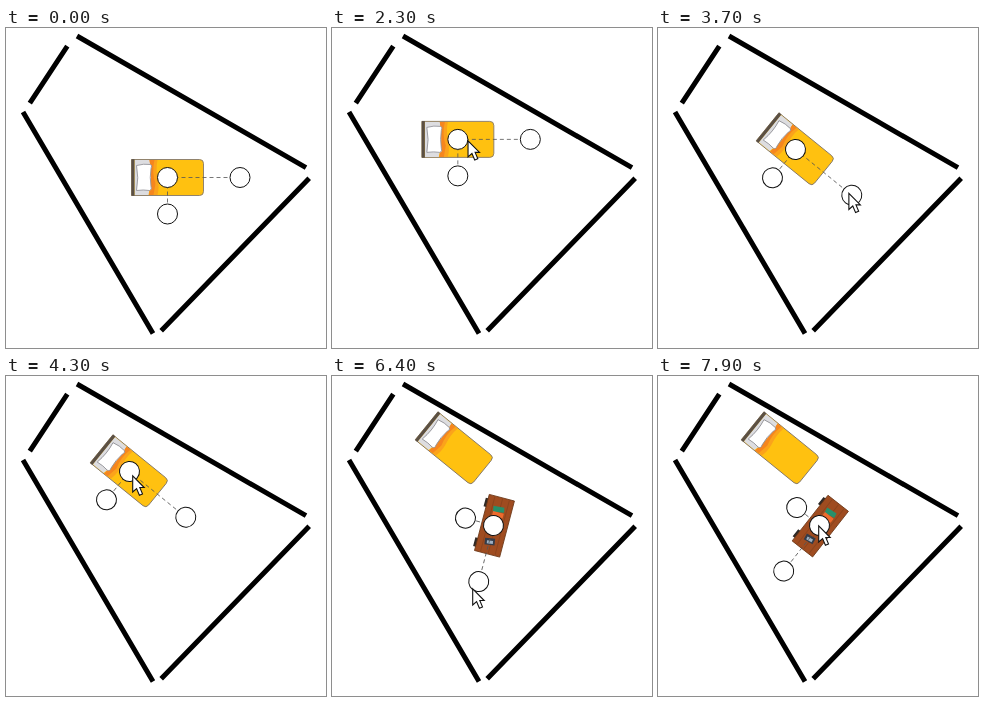
Animation of 320 by 320 pixels, one loop 8 s. Source, as an HTML page:

```html
<!DOCTYPE html>
<html lang="en">
<head>
<meta charset="utf-8">
<title>Room planner</title>
<style>
  html, body { margin: 0; width: 100%; height: 100%; overflow: hidden; background: #fff; }
  svg { display: block; width: 100vw; height: 100vh; }
  .walls { stroke: #000; stroke-width: 5; }
  .handles line { stroke: #555; stroke-width: .8; stroke-dasharray: 4 3; }
  .handles circle { fill: #fff; stroke: #111; stroke-width: 1; }
</style>
</head>
<body>
<svg viewBox="0 0 320 320">
  <path class="walls" d="M71 8 300 139.700M303.200 150.200 155.200 302.700M147 305.500 17 84M23.800 75.200 61.300 18.200"/>

  <g id="bed">
    <path d="M-36-18H32Q36-18 36-14V14Q36 18 32 18H-36Z" fill="#ffc110" stroke="#85796a" stroke-width=".9"/>
    <path d="M-33-17.500H-17Q-14-6-17 6L-19 17.500H-33Z" fill="#dddde0"/>
    <path d="M-18-17.500H-10Q-12-8-9.500 2 -8 10-10 17.500H-18.500Q-14 0-18-17.500Z" fill="#fba31b"/>
    <path d="M-18-17.500H-13Q-16-5-12 6L-14 17.500H-18.500Q-15 0-18-17.500Z" fill="#f5861f"/>
    <path d="M-31-12Q-24-14-17-13 -15-12-16.500-9 -18 0-16.500 9 -15 12-18 13 -24 12-31 13 -28.500 0-31-12Z" fill="#fff" stroke="#96969c" stroke-width=".9"/>
    <path d="M-36-18.300H-33V18.300H-36Z" fill="#5b5045"/>
  </g>

  <g id="desk">
    <path d="M-25 11H-16V14.500H-25ZM16 11H25V14.500H16Z" fill="#2f2926"/>
    <path d="M-29-14H29V12H-29Z" fill="#9f4c20" stroke="#6b3717" stroke-width=".8"/>
    <path d="M-28-9H28M-28-2H28M-28 6H28" stroke="#8c441d"/>
    <path d="M-20-6-15-7-13 4-19 5Z" fill="#27906a"/>
    <path d="M-14-7H-9V4H-14Z" fill="#ee6a2c"/>
    <path d="M12.500-5 19-6 20.500 4 14 5Z" fill="#343c49"/>
    <path d="M15-3.500 18-4 19 2 16 2.500Z" fill="#9fb2c4"/>
  </g>

  <g id="handles" class="handles">
    <line id="longArm"/><line id="shortArm"/>
    <circle r="10"/><circle id="longKnob" r="10"/><circle id="shortKnob" r="10"/>
  </g>

  <path id="cursor" d="M.7.900V17L4.600 13.600 7.400 20.200 10.500 18.900 7.800 12.500H12.200Z" fill="#fff" stroke="#111" stroke-width="1.100"/>
</svg>

<script>
const LOOP = 8000, STEP = 100, LAG = 115;
const DESK_SHOWN = 5400;
const START = [161.5, 149.5];
const el = id => document.getElementById(id);

// The pointer eases between these stops [ms, x, y]; the furniture follows it.
const stops = [
  [800, 183, -24], [1700, 171, 150], [1800, 171, 150],
  [2100, 102, 83], [2400, 147, 122], [2500, 147, 122],
  [2700, 212, 123], [2800, 212, 123], [3000, 207, 159], [3300, 196, 169], [3600, 196, 169],
  [4100, 140, 125], [4300, 126, 99], [4700, 125, 76], [4800, 125, 76],
  [4900, 145, 86], [5400, 145, 86], [5500, 189, 115], [5900, 211, 142], [6100, 211, 142],
  [6400, 140, 212], [6700, 44, 148], [7000, 76, 219], [7200, 88, 234],
  [7600, 190, 180], [7900, 160, 149]
];

const clamp = (value, low, high) => Math.min(Math.max(value, low), high);

function pointer(ms) {
  const t = clamp(ms, stops[0][0], stops[stops.length - 1][0]);
  const next = Math.max(1, stops.findIndex(stop => stop[0] >= t));
  const [t0, x0, y0] = stops[next - 1], [t1, x1, y1] = stops[next];
  const p = (t - t0) / (t1 - t0), eased = p * p * (3 - 2 * p);
  return [x0 + (x1 - x0) * eased, y0 + (y1 - y0) * eased];
}

// Displacement of the pointer within one drag.
function dragged(ms, from, to) {
  const [x0, y0] = pointer(from), [x, y] = pointer(clamp(ms, from, to));
  return [x - x0, y - y0];
}

// Direction from a pivot to the pointer while a turn lasts.
function turned(ms, from, to, [cx, cy], grip = 0) {
  if (ms <= from) return 0;
  const [x, y] = pointer(Math.min(ms, to));
  return Math.atan2(y + grip - cy, x + grip - cx) * 180 / Math.PI;
}

function bedPose(ms) {
  const first = dragged(ms, 1800, 2500), second = dragged(ms, 4100, 4800);
  const pivot = START.map((value, i) => value + first[i]);
  return [...pivot.map((value, i) => value + second[i]), turned(ms - LAG, 2800, 3600, pivot)];
}

const deskPose = ms => [...START, turned(ms, 6100, 7200, START, 4)];

function place(id, [x, y, angle = 0]) {
  el(id).setAttribute("transform", `translate(${x} ${y}) rotate(${angle})`);
}

function setArms(long, short) {
  el("longArm").setAttribute("x2", long);
  el("longKnob").setAttribute("cx", long);
  el("shortArm").setAttribute("y2", short);
  el("shortKnob").setAttribute("cy", short);
}

function render(ms) {
  const bed = bedPose(ms), desk = deskPose(ms);
  const deskShown = ms >= DESK_SHOWN;
  place("bed", bed);
  place("desk", desk);
  place("handles", deskShown ? desk : bed);
  place("cursor", pointer(ms));
  el("desk").style.display = deskShown ? "" : "none";
  deskShown ? setArms(58, 29) : setArms(72.5, 36.5);
}

const start = performance.now();
function tick() {
  const ms = (performance.now() - start) % LOOP;
  render(Math.floor(ms / STEP) * STEP);
  requestAnimationFrame(tick);
}
tick();
</script>
</body>
</html>
```
